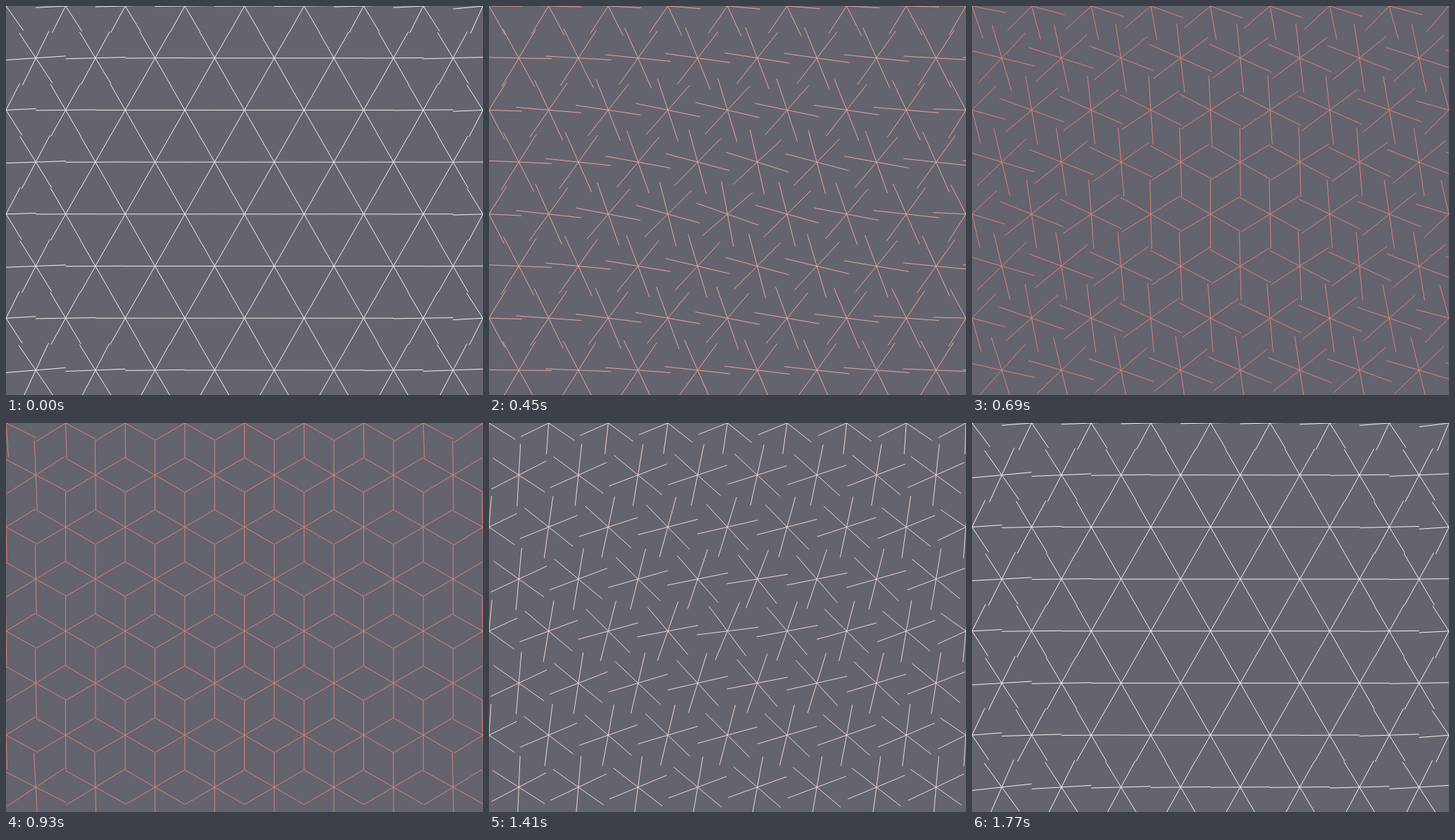
An HTML page with a canvas that plays this animation: 693x566 px, repeating every 1.8 s.

```html
<!DOCTYPE html>
<html lang="en">
<head>
<meta charset="utf-8">
<title>Turning lattice</title>
<style>
html, body { margin: 0; width: 100%; height: 100%; overflow: hidden; background: #64646e; }
canvas { display: block; }
</style>
</head>
<body>
<canvas id="stage" width="693" height="566"></canvas>
<script>
const W = 693, H = 566;
const LOOP = 1800, STEP = 30;
const COLS = 9, ROWS = 8;
const SIDE = 50 * Math.sqrt(3);
const STRETCH = 1.0093;
const ROW = 75 * STRETCH;
const PALE = [246, 246, 242], CORAL = [226, 124, 117];
const ctx = document.getElementById('stage').getContext('2d');

const mix = (a, b, k) => a + (b - a) * k;

function ease(x) {
  x = Math.min(1, Math.max(0, x));
  return x * x * (3 - 2 * x);
}

// Two 30 degree turns per loop, spreading outwards from the middle.
function turn(u, dist) {
  let sum = -1;
  for (let k = -1; k <= 1; k++) {
    sum += ease((u - k) * 4 / 3 - 0.042 - dist * 0.00127);
  }
  return sum * Math.PI / 6;
}

function star(x, y, angle, len) {
  for (let i = 0; i < 3; i++) {
    const a = angle + i * Math.PI / 3;
    const dx = len * Math.cos(a), dy = len * Math.sin(a) * STRETCH;
    ctx.moveTo(x - dx, y - dy);
    ctx.lineTo(x + dx, y + dy);
  }
}

function draw(ms) {
  const t = ms / LOOP;
  const swell = 0.5 + 0.5 * Math.cos(2 * Math.PI * (t - 0.45));
  const len = mix(SIDE / 2, 50, swell);
  const rgb = PALE.map((c, i) => Math.round(mix(c, CORAL[i], swell)));

  ctx.fillStyle = '#64646e';
  ctx.fillRect(0, 0, W, H);
  ctx.strokeStyle = `rgb(${rgb})`;
  ctx.lineWidth = 1;
  ctx.beginPath();
  for (let r = 0; r < ROWS; r++) {
    for (let c = 0; c < COLS; c++) {
      const x = c * SIDE, y = r * ROW;
      // the delay ignores the half-cell shift of odd rows
      const dist = Math.hypot(x - W / 2, y - H / 2);
      star(x + (r % 2) * SIDE / 2, y, turn(2 * t, dist), len);
    }
  }
  ctx.stroke();
}

const start = performance.now();

function tick() {
  const ms = (performance.now() - start) % LOOP;
  draw(Math.floor(ms / STEP) * STEP);
  requestAnimationFrame(tick);
}

tick();
</script>
</body>
</html>
```
